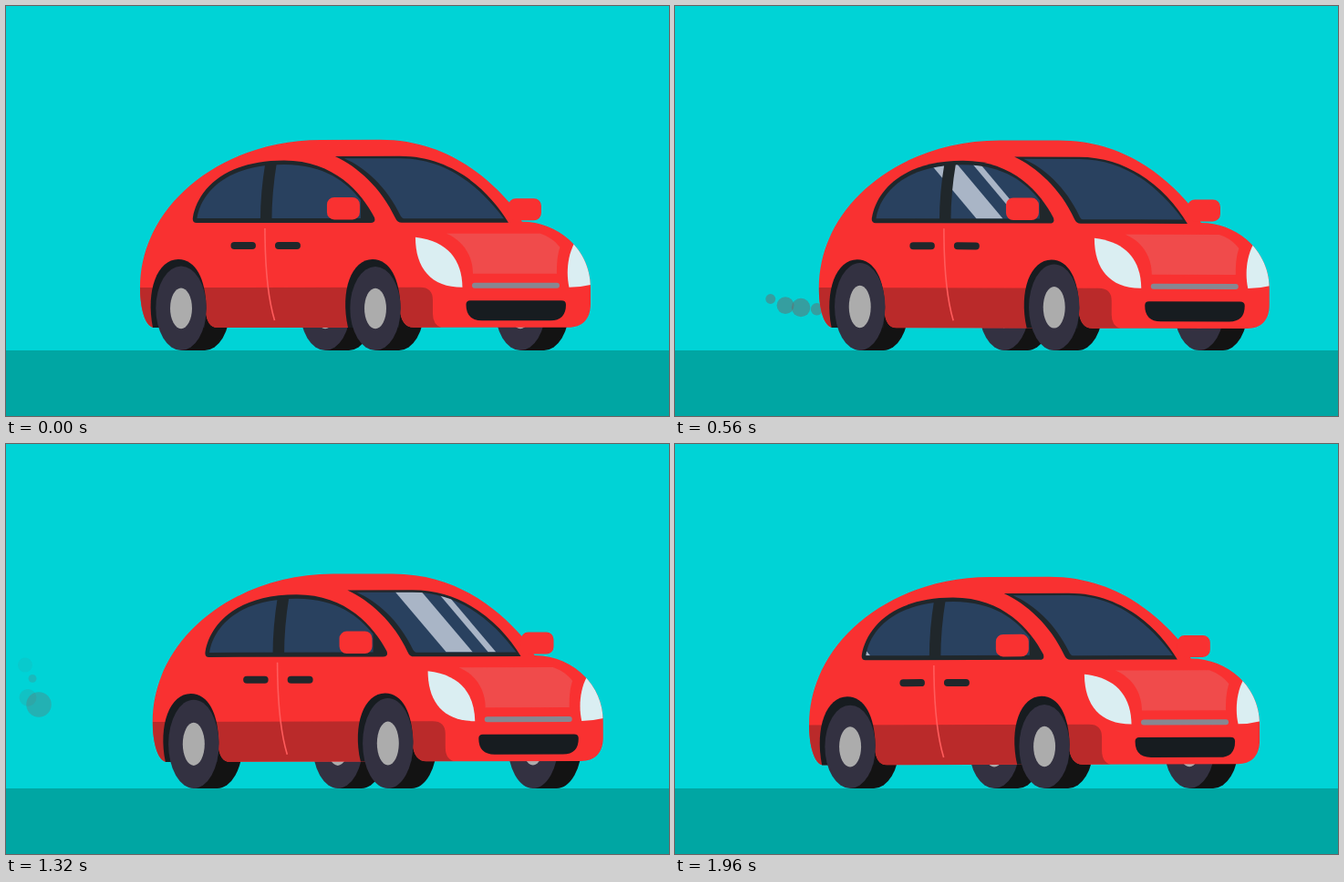
An HTML page that plays this animation: 727x450 px, repeating every 2 s.

```html
<!DOCTYPE html>
<html lang="en">
<head>
<meta charset="utf-8">
<title>Red car</title>
<style>
  html, body { margin: 0; width: 100%; height: 100%; overflow: hidden; background: #00d3d6; }
  svg { display: block; width: 727px; height: 450px; }
  .red { fill: #f93131; }
  .frame { fill: #20272b; }
  .glass { fill: #29415f; }
  .trim { fill: #171c20; }
  .lamp { fill: #daeef2; }
  .glare { fill: #a9b5c6; }
  .puff { fill: #6a6a6a; }
</style>
</head>
<body>
<svg viewBox="0 0 727 450">
  <defs>
    <path id="shell" d="M147 309 C147 219 236 147 345 147 H410 C480 147 525 185 553 217 L566 237
      C607 237 641 269 641 309 V327 C641 345 631 353 617 353 H447 C438 353 433 346 432 334
      L405 331 L390 353 H232 C224 353 219.5 346 219 334 L205 331 L190 353 H163
      C152 353 147 330 147 309 Z"/>
    <path id="sideGlass" d="M209.5 233 C214 205 241 174 305 174 C350 174 374 194 389 213 V233 Z"/>
    <path id="windshield" d="M371 167.3 H432 C487 167.3 523 203 546 233.5 H436 Q434.5 233.5 433 231
      C417 197 393 177 371 167.3 Z"/>
    <clipPath id="shellClip"><use href="#shell"/></clipPath>
    <clipPath id="glassClip"><use href="#sideGlass"/><use href="#windshield"/></clipPath>

    <path id="tread" fill="#131313" d="M0 0 V-93 H26 A27.7 46.5 0 0 1 26 0 Z"/>
    <g id="face">
      <ellipse cy="-46.5" rx="27.7" ry="46.5" fill="#333141"/>
      <ellipse cy="-46.5" rx="12" ry="22.5" fill="#acacac"/>
    </g>
  </defs>

  <rect width="727" height="450" fill="#00d3d6"/>
  <rect y="378" width="727" height="72" fill="#00a6a3"/>
  <g id="smoke"></g>

  <g id="car">
    <use href="#tread" class="wheel" data-x="350" data-axle="rear"/>
    <use href="#face" class="wheel" data-x="350" data-axle="rear"/>
    <use href="#tread" class="wheel" data-x="564" data-axle="front"/>
    <use href="#face" class="wheel" data-x="564" data-axle="front"/>
    <use href="#tread" class="wheel" data-x="192" data-axle="rear"/>
    <use href="#tread" class="wheel" data-x="405" data-axle="front"/>

    <g id="body">
      <use href="#shell" class="red"/>
      <rect class="red" x="551" y="211.5" width="36" height="24" rx="8"/>
      <g clip-path="url(#shellClip)">
        <path fill="#ba2a2a" d="M140 309 H454 Q468 309 468 323 V338 Q468 353 482 354 H140 Z"/>
        <path class="lamp" d="M623.5 260 C614 278 615 298 617.5 309 Q630 309 642 306 V260 Z"/>
      </g>
      <path class="trim" d="M161 353 C153 312 166 278 189 278 C208 278 219 300 219.5 331 L218 353 Z"/>
      <path class="trim" d="M375 353 C366 312 379 278 402 278 C421 278 432 300 432.5 331 L431 353 Z"/>

      <path class="frame" d="M205 232 C210 203 238 169.5 305 169.5 C360 169.5 390 205 404 232
        Q406 238 400 238 H209 Q204 238 205 232 Z"/>
      <path class="frame" d="M361 165 H432 C490 165 530 203 551 238 H434 Q429 238 427 233
        C412 200 385 176 361 165 Z"/>
      <use href="#sideGlass" class="glass"/>
      <use href="#windshield" class="glass"/>
      <g clip-path="url(#glassClip)">
        <g id="glare" class="glare" transform="translate(612 0)">
          <path d="M-29 233 H0 L-59 163 H-88 Z"/>
          <path d="M17 233 H25.5 L-33.5 163 H-42 Z"/>
        </g>
      </g>
      <path class="frame" d="M284.5 172 H297 Q291.5 205 291.5 235 H279 Q279 205 284.5 172 Z"/>
      <rect class="red" x="352" y="210" width="36" height="24.5" rx="8"/>

      <path d="M284 244 C284 285 287 320 294.5 345" fill="none" stroke="#ff5c5c" stroke-width="1.6"/>
      <rect class="frame" x="246.5" y="259" width="27.5" height="8" rx="4"/>
      <rect class="frame" x="295" y="259" width="28" height="8" rx="4"/>

      <path fill="#f04b4b" d="M483 250 H586 Q599 254 607.5 265 C604.5 274 604 283 604 294 H512 C512 275 502 258 483 250 Z"/>
      <path class="lamp" d="M449 254 C484 258 500 278 500.5 309 C466 309 449 288 449 254 Z"/>
      <rect x="511" y="304" width="96" height="6" rx="3" fill="#878791"/>
      <path class="trim" d="M509 323.5 H609 Q614 323.5 614 328 Q614 345.5 597 345.5 H522 Q504.5 345.5 504.5 328 Q504.5 323.5 509 323.5 Z"/>
    </g>

    <use href="#face" class="wheel" data-x="192" data-axle="rear"/>
    <use href="#face" class="wheel" data-x="405" data-axle="front"/>
  </g>
</svg>
<script>
  const LOOP = 2000, STEP = 40, BOUNCE = 500, SWEEP = 1000;
  const FIRST_PUFF = 285, PUFF_GAP = 72, PUFF_LIFE = 960;
  const $ = id => document.getElementById(id);
  const wave = (phase, peak) => Math.cos(2 * Math.PI * (phase - peak));
  const smooth = u => u * u * (3 - 2 * u);
  const move = (el, value) => el.setAttribute("transform", value);

  const wheels = [...document.querySelectorAll(".wheel")];
  const puffs = [
    { size: 6, rise: 140 }, { size: 11.5, rise: 98 }, { size: 14.5, rise: 105 },
    { size: 13, rise: 75 }, { size: 5.3, rise: 125 }, { size: 15, rise: 95 }
  ].map((puff, i) => {
    const el = document.createElementNS("http://www.w3.org/2000/svg", "circle");
    el.setAttribute("class", "puff");
    $("smoke").append(el);
    return { ...puff, el, born: FIRST_PUFF + i * PUFF_GAP };
  });

  // A puff slows as it drifts back, speeds up as it rises, swells, shrinks and fades.
  function drawPuff({ el, born, size, rise }, t) {
    const u = (t - born) / PUFF_LIFE;
    const live = u > 0 && u < 1;
    el.setAttribute("visibility", live ? "visible" : "hidden");
    if (!live) return;
    el.setAttribute("cx", 170 - 150 * Math.sin(u * Math.PI / 2));
    el.setAttribute("cy", 333 - rise * u * u);
    el.setAttribute("r", size * Math.sin(u * Math.PI) ** 0.4);
    el.setAttribute("opacity", 0.5 * Math.min(1, 2.2 * (1 - u)));
  }

  function drawCar(t) {
    const half = LOOP / 2;
    move($("car"), `translate(${18.2 * smooth(1 - Math.abs(t / half - 1))} 0)`);

    const p = t % BOUNCE / BOUNCE;
    const rear = -2 + 2.2 * wave(p, 0.06), front = -2 + 3 * wave(p, 0.15);
    const tilt = Math.atan((front - rear) / 430) * 180 / Math.PI;
    move($("body"), `translate(0 ${rear}) rotate(${tilt} 150 330)`);

    const stretch = {
      rear: 1.043 - 0.061 * wave(p, 0.9),
      front: 1.043 - 0.056 * wave(p, 0.95)
    };
    for (const w of wheels)
      move(w, `translate(${w.dataset.x} 378) scale(1 ${stretch[w.dataset.axle]})`);
  }

  function drawGlare(t) {
    const q = t % SWEEP / SWEEP;
    move($("glare"), `translate(${187 + (432 - 68 * q) * (1 - smooth(q))} 0)`);
  }

  function draw(t) {
    drawCar(t);
    drawGlare(t);
    puffs.forEach(puff => drawPuff(puff, t));
  }

  const start = performance.now();
  function tick() {
    const t = (performance.now() - start) % LOOP;
    draw(Math.floor(t / STEP) * STEP);
    requestAnimationFrame(tick);
  }
  tick();
</script>
</body>
</html>
```
